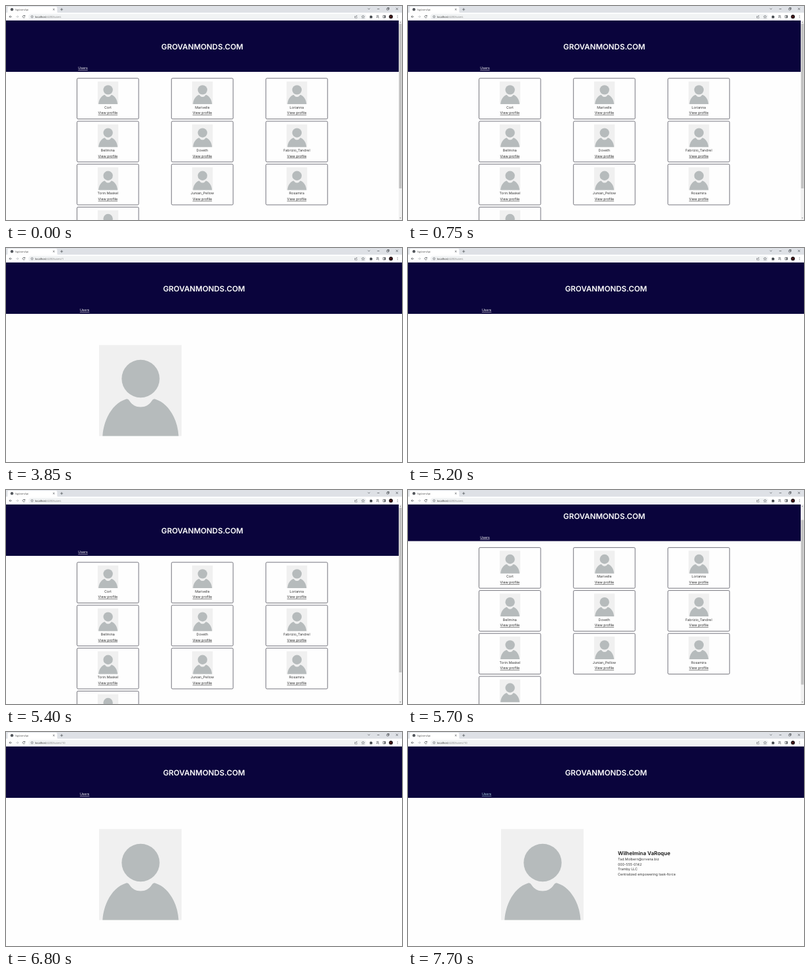
Write an HTML page that moves like this. It is 600 by 325 pixels and loops after 8 s.

```html
<!DOCTYPE html>
<html lang="en">
<head>
<meta charset="utf-8">
<title>Users</title>
<style>
  html, body { margin: 0; width: 100%; height: 100%; overflow: hidden; background: #fefefe; }
  svg { display: block; }
  #stage { width: 600px; height: 325px; }
  text { font: 5.25px Inter, sans-serif; fill: #333; text-rendering: geometricPrecision; white-space: pre; }
  .mid { text-anchor: middle; }
  .link { text-decoration: underline; text-decoration-thickness: .4px; fill: #222; }
  .nav { fill: #fff; }
  .hover { fill: #add8e6; }
  .title { font-size: 11.5px; font-weight: 600; fill: #fff; }
  .name { font-size: 8px; font-weight: 600; fill: #111; }
  .url { font: 4.1px "Open Sans", sans-serif; fill: #777; }
  .tab { font: 3.7px "Open Sans", sans-serif; fill: #444; }
  .icon { fill: none; stroke: #4b4f54; stroke-width: .7; }
</style>
</head>
<body>
<svg id="stage" viewBox="0 0 600 325">
  <defs>
    <g id="avatar">
      <rect width="125" height="138" fill="#f0f0f0"/>
      <g fill="#b6bbbc">
        <circle cx="63" cy="51" r="28.7"/>
        <path d="M5.3 138C7 112 21 88 41 82Q44 81 46 84.5C50 91 56 94 63 94S76 91 80 84.5Q82 81 85 82C105 88 119 112 120.5 138Z"/>
      </g>
    </g>
  </defs>
  <rect width="600" height="325" fill="#fefefe"/>
  <svg id="view" y="22" width="600" height="303" viewBox="0 22 600 303">
    <g id="page">
      <rect y="22" width="600" height="78" fill="#0a043c"/>
      <g id="head"></g>
      <g id="list"></g>
    </g>
    <g id="profile"><use href="#avatar" x="141" y="147.5"/></g>
    <g id="bar">
      <rect x="595" y="22" width="5" height="303" fill="#f1f1f1"/>
      <path d="M596.4 25.3l1.1-1.3 1.1 1.3zM596.4 321.5l1.1 1.3 1.1-1.3z" fill="#606060"/>
      <rect id="thumb" x="595.5" y="27" width="4" height="250" fill="#c1c1c1"/>
    </g>
  </svg>
  <g id="chrome">
    <rect width="600" height="10.5" fill="#dee1e6"/>
    <path d="M1 10.5Q2.5 10.5 2.5 8.5V3Q2.5 1 4.5 1H75.5Q77.5 1 77.5 3V8.5Q77.5 10.5 79 10.5Z" fill="#fff"/>
    <rect y="10.3" width="600" height="11.7" fill="#fff"/>
    <rect x="34" y="12" width="512" height="8.5" rx="4.2" fill="#f1f3f4"/>
    <circle cx="9" cy="5.3" r="2.2" fill="#54585d"/>
    <g class="icon">
      <path d="M71.2 4l2.4 2.4m0-2.4l-2.4 2.4M82.3 5.2h4m-2-2v4"/>
      <path d="M548.3 3.6l1.5 1.5 1.5-1.5M562.5 4.5h3.2M577 3.5h2.5v2.5h-2.5zM578 3.3v-.8h2.4v2.6h-.8M590.8 2.8l3.2 3.2m0-3.2l-3.2 3.2"/>
      <path d="M9 16.2H5m1.8-1.8L5 16.2l1.8 1.8"/>
      <path d="M15 16.2h4m-1.8-1.8l1.8 1.8-1.8 1.8" stroke="#b5b8bc"/>
      <path d="M28.4 15a1.8 1.8 0 1 0 .3 1.8M28.8 13.9v1.5h-1.5"/>
      <circle cx="39.5" cy="16.2" r="1.7" stroke-width=".5"/>
      <path d="M39.5 16v1.1m0-1.8v.4" stroke-width=".5"/>
      <path d="M529.5 15.5h-1v2.6h3.5v-1M529.7 16.8q.2-1.7 2-1.7m-.8-1l1 1-1 1" stroke-width=".5"/>
      <path d="M541 14l.7 1.5 1.6.2-1.2 1.1.3 1.6-1.4-.8-1.4.8.3-1.6-1.2-1.1 1.6-.2z" stroke-width=".5"/>
      <path d="M561.3 14.7h3.4m-3.4 1.4h3.4m-3.4 1.4h1.6m1.7-1v2"/>
      <path d="M571.3 14.4h3.6v3.5h-3.6z"/>
    </g>
    <path d="M551.2 15h1a.8.8 0 0 1 1.6 0h1v1a.8.8 0 0 1 0 1.5v1h-3.6z" fill="#45494e"/>
    <path d="M573.3 14.4h1.6v3.5h-1.6z" fill="#45494e"/>
    <circle cx="583.2" cy="16.2" r="2.9" fill="#1c0d10"/>
    <circle cx="583.2" cy="16.4" r="1.1" fill="#7a2424"/>
    <path d="M593.2 14.2v.8m0 .8v.8m0 .8v.8" stroke="#45494e" stroke-width=".8"/>
  </g>
</svg>
<script>
const LOOP = 8000;
const $ = id => document.getElementById(id);

function add(parent, tag, attrs, content = '') {
  const el = document.createElementNS('http://www.w3.org/2000/svg', tag);
  for (const key in attrs) el.setAttribute(key, attrs[key]);
  el.textContent = content;
  return parent.appendChild(el);
}
const label = (parent, x, y, cls, content) => add(parent, 'text', { x, y, class: cls }, content);
const show = (el, on) => el.setAttribute('display', on ? 'inline' : 'none');

// Browser labels
label($('chrome'), 14, 6.7, 'tab', 'NgUsersApi');
const url = label($('chrome'), 44, 17.7, 'url', '');
add(url, 'tspan', { fill: '#222' }, 'localhost');
const path = add(url, 'tspan', {});

// Page header
label($('head'), 297.4, 66.2, 'title mid', 'GROVANMONDS.COM');
const nav = label($('head'), 109.3, 96.2, 'link nav', 'Users');

// User cards
const users = ['Cort', 'Marivelle', 'Lorianna', 'Bellmina', 'Doveth', 'Fabrizio_Tandrel',
  'Torin.Maskel', 'Junian_Pellow', 'Rosamira', 'Nerina.Colvent'];
const links = users.map((user, i) => {
  const x = 107.6 + i % 3 * 143.1, y = 109.8 + Math.floor(i / 3) * 65.2;
  const card = add($('list'), 'g', { transform: `translate(${x} ${y})` });
  add(card, 'rect', { width: 93.4, height: 61.8, rx: 1.6, fill: '#fefefe', stroke: '#3c3c48', 'stroke-width': .7 });
  add(card, 'use', { href: '#avatar', transform: 'translate(31.3 4.8) scale(.25)' });
  label(card, 46.7, 46, 'mid', user);
  return label(card, 46.7, 54.7, 'link mid', 'View profile');
});

// Profile details
const details = [
  ['Maelle Tornby', 'Candrel@orvoni.biz', '1-000-555-0137 x20418', 'Vandrelo-Misket', 'Multi-layered client-server neural-net'],
  ['Wilhelmina VaRoque', 'Tad.Molbern@orvena.biz', '000-555-0142', 'Tramby LLC', 'Centralized empowering task-force']
].map(lines => {
  const block = add($('profile'), 'g', {});
  lines.forEach((line, i) => label(block, 318, i ? 187.8 + i * 7.5 : 187, i ? '' : 'name', line));
  return block;
});

// [start, path, view, hovered link, loaded profile]
const steps = [
  [0, '/users', 'list'],
  [2900, '/users', 'list', links[0]],
  [3850, '/users/1', 'profile'],
  [3900, '/users/1', 'profile', null, 0],
  [4850, '/users/1', 'profile', nav, 0],
  [5200, '/users', 'empty'],
  [5250, '/users', 'list'],
  [6350, '/users', 'list', links[9]],
  [6800, '/users/10', 'profile'],
  [6850, '/users/10', 'profile', null, 1],
  [7700, '/users/10', 'profile', nav, 1]
];
const scrolls = [[0, 0], [5600, 3], [5650, 12], [5700, 22.4], [5750, 35], [5800, 46], [5850, 52], [6800, 0]];
const at = (table, t) => table.filter(row => row[0] <= t).pop();

function render(t) {
  const [, route, view, hovered, loaded] = at(steps, t);
  const scroll = at(scrolls, t)[1];
  const list = view === 'list';
  path.textContent = ':4200' + route;
  show($('list'), list);
  show($('bar'), list);
  show($('profile'), view === 'profile');
  details.forEach((block, i) => show(block, i === loaded));
  [nav, ...links].forEach(link => link.classList.toggle('hover', link === hovered));
  $('head').setAttribute('transform', `translate(${list ? 0 : 2.6} 0)`);
  $('page').setAttribute('transform', `translate(0 ${-scroll})`);
  $('thumb').setAttribute('y', 27 + scroll * 43 / 52);
}

const start = performance.now();
function tick() {
  render((performance.now() - start) % LOOP);
  requestAnimationFrame(tick);
}
tick();
</script>
</body>
</html>
```
